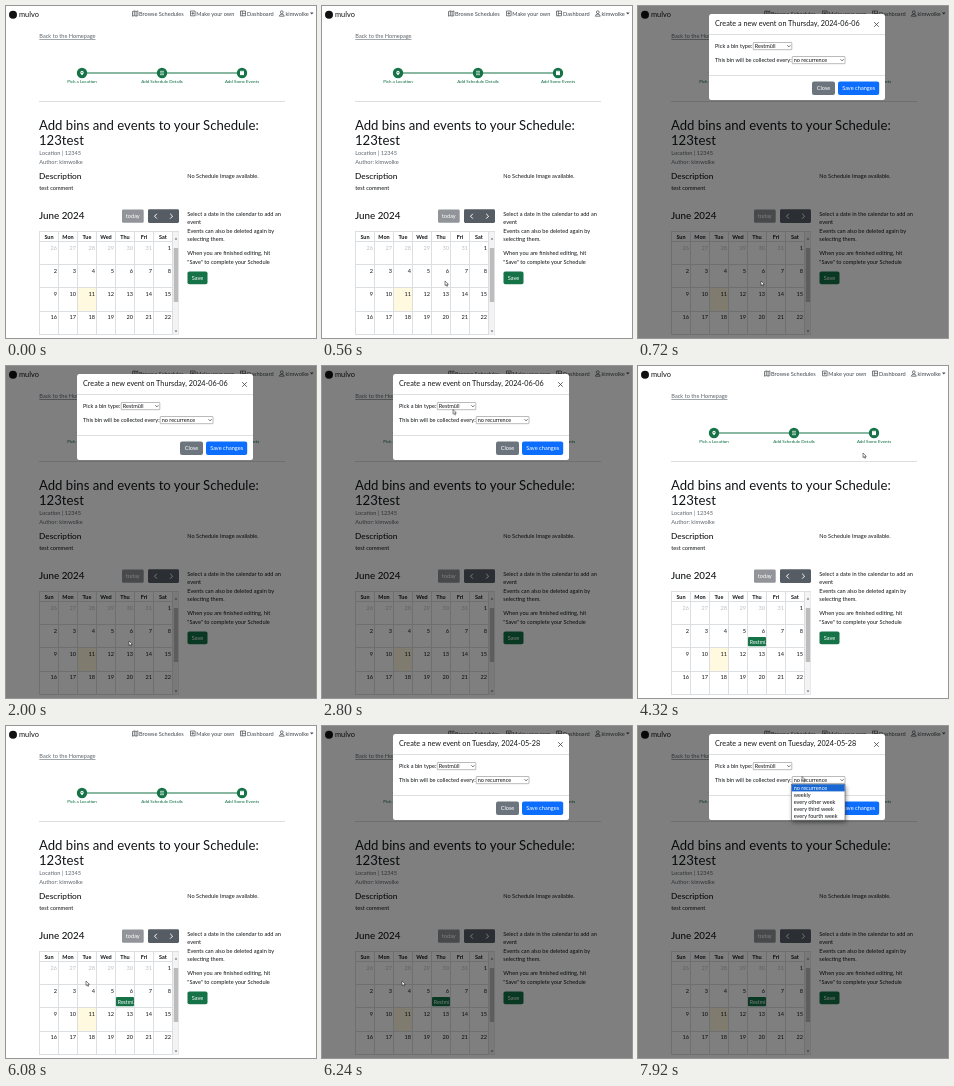
An HTML page that plays this animation: 310x332 px, repeating every 8000 ms.

```html
<!DOCTYPE html>
<html lang="en">
<head>
<meta charset="utf-8">
<title>Schedule editor</title>
<style>
html, body { margin: 0; width: 100%; height: 100%; overflow: hidden; background: #fff; }
svg { display: block; width: 310px; height: 332px; }
text { font: 5.62px Lato, sans-serif; fill: #111417; }
.mid { text-anchor: middle; }
.end { text-anchor: end; }
.muted { fill: #5c646b; }
.nav { fill: #43484d; }
.white { fill: #fff; }
.h1 { font-size: 13.15px; }
.h2 { font-size: 9.8px; font-weight: 500; }
.h3 { font-size: 8.3px; font-weight: 500; }
.title { font-size: 7.25px; }
.step { font-size: 4.45px; fill: #157347; font-weight: 500; text-anchor: middle; }
.day { font-size: 5.5px; font-weight: 700; text-anchor: middle; }
.other { fill: #bcbec0; }
.opt { font-size: 5.5px; }
.line { fill: none; stroke: #dcdfe2; stroke-width: 1; shape-rendering: crispEdges; }
.icon { fill: none; stroke: #43484d; stroke-width: .7; }
.glyph { fill: none; stroke: #fff; stroke-width: .7; }
.green { fill: #157347; }

.anim { animation: 8s infinite step-end; }
#modal { animation-name: modal; }
#thu { animation-name: thursday; }
#tue { animation-name: tuesday; }
#event { animation-name: event; }
#list { animation-name: list; }
#submit { animation-name: hover; }
#cursor { animation: move 8s infinite ease-in-out, show 8s infinite step-end; }
@keyframes modal { 0%, 54% { visibility: hidden } 9%, 78% { visibility: visible } }
@keyframes thursday { 0% { opacity: 1 } 54% { opacity: 0 } }
@keyframes tuesday { 0% { opacity: 0 } 54% { opacity: 1 } }
@keyframes event { 0% { visibility: hidden } 54% { visibility: visible } }
@keyframes list { 0% { visibility: hidden } 99% { visibility: visible } }
@keyframes hover { 0%, 54% { fill: #0d6efd } 47% { fill: #0b5ed7 } }
@keyframes show { 0% { opacity: 0 } 1% { opacity: 1 } }
@keyframes move {
  0%, 1% { transform: translate(150px, 296px) }
  7%, 25% { transform: translate(123px, 275px) }
  35%, 42% { transform: translate(131px, 43.5px) }
  50%, 62% { transform: translate(225px, 87px) }
  72%, 83% { transform: translate(80px, 255px) }
  93%, 94% { transform: translate(166px, 49px) }
  97%, 100% { transform: translate(164px, 50.5px) }
}
</style>
</head>
<body>
<svg viewBox="0 0 310 332">
  <circle cx="7" cy="8.8" r="4" fill="#111"/>
  <text x="13" y="11.2" style="font-size:7.4px">mulvo</text>
  <g class="icon">
    <path d="M126.500 5.500l1.800-.6 1.800 .6 1.800-.6v4.700l-1.800 .6-1.800-.6-1.800 .6zM128.300 5v4.500M130.100 5.500v4.500"/>
    <path d="M184.500 5h4.600v4.800h-4.600zM186.800 6v2.800M185.400 7.400h2.800"/>
    <path d="M234.500 5h5v4.800h-5zM236.300 5v4.800M236.300 7.400h3.200"/>
    <circle cx="275.800" cy="6.200" r="1.400"/>
    <path d="M273.400 10.200q0-2 2.400-2t2.400 2z"/>
  </g>
  <text class="nav" x="133" y="9.700">Browse Schedules</text>
  <text class="nav" x="190.300" y="9.700">Make your own</text>
  <text class="nav" x="241" y="9.700">Dashboard</text>
  <text class="nav" x="279.500" y="9.700">kimwolke</text>
  <path d="M304 6.600h3.600l-1.800 2z" fill="#43484d"/>

  <text class="muted" x="33.300" y="32" text-decoration="underline">Back to the Homepage</text>

  <path d="M76 67H236" stroke="#157347" stroke-width="1.200"/>
  <g class="green">
    <circle cx="76" cy="67" r="5.200"/><circle cx="156" cy="67" r="5.200"/><circle cx="236" cy="67" r="5.200"/>
  </g>
  <path class="white" d="M76 69.300q-2.500-2.600-1.300-3.900a1.800 1.800 0 0 1 2.600 0q1.200 1.300-1.300 3.900z"/>
  <circle class="green" cx="76" cy="66.400" r=".6"/>
  <path class="glyph" d="M154 65.300h4M154 67h4M154 68.700h4"/>
  <path class="white" d="M234 65.200h4v3.900h-4z"/>
  <path class="glyph" d="M235 64.400v1M237 64.400v1"/>
  <text class="step" x="76" y="77">Pick a Location</text>
  <text class="step" x="156" y="77">Add Schedule Details</text>
  <text class="step" x="236" y="77">Add Some Events</text>
  <path class="line" d="M33 95.500H279"/>

  <text class="h1" x="33" y="124">Add bins and events to your Schedule:</text>
  <text class="h1" x="33" y="138.600">123test</text>
  <text class="muted" x="33.300" y="149">Location | 12345</text>
  <text class="muted" x="33.300" y="157.700">Author: kimwolke</text>
  <text class="h3" x="33" y="172.500">Description</text>
  <text x="181.300" y="171.500">No Schedule Image available.</text>
  <text x="33.300" y="184.200">test comment</text>

  <text class="h2" x="33" y="213">June 2024</text>
  <rect x="116" y="203.500" width="21.700" height="13.300" rx="1.400" fill="#919498"/>
  <text class="mid white" x="126.800" y="212.200">today</text>
  <rect x="142" y="203.300" width="31" height="13.700" rx="1.400" fill="#565c64"/>
  <path class="glyph" style="stroke-width:1" d="M150.900 207.800l-2.400 2.400 2.400 2.400M164.200 207.800l2.400 2.400-2.400 2.400"/>

  <rect x="71.500" y="282" width="19" height="23" fill="#fffadf"/>
  <g id="grid"></g>
  <rect x="167" y="226" width="5.500" height="102.500" fill="#f3f3f3"/>
  <rect x="167.800" y="242" width="4.400" height="54" fill="#bcbcbc"/>
  <path d="M168.700 233.500l1.300-1.700 1.300 1.700zM168.700 324.500l1.300 1.700 1.300-1.700z" fill="#666"/>
  <g id="event" class="anim">
    <rect class="green" x="110" y="271" width="18" height="9.300" rx="1"/>
    <svg x="110" y="271" width="17.500" height="9.300" viewBox="0 0 17.500 9.300">
      <text class="white" x="1.800" y="6.700" style="font-size:5.200px">Restmüll</text>
    </svg>
  </g>

  <text x="181.300" y="209.700">Select a date in the calendar to add an</text>
  <text x="181.300" y="218.200">event</text>
  <text x="181.300" y="226.700">Events can also be deleted again by</text>
  <text x="181.300" y="235.200">selecting them.</text>
  <text x="181.300" y="249.200">When you are finished editing, hit</text>
  <text x="181.300" y="257.700">"Save" to complete your Schedule</text>
  <rect class="green" x="181.500" y="265.500" width="20" height="12.800" rx="1.800"/>
  <text class="mid white" x="191.500" y="274">Save</text>

  <g id="modal" class="anim">
    <rect width="310" height="332" opacity=".5"/>
    <rect x="71" y="8" width="176" height="86" rx="2.500" fill="#fff"/>
    <path class="line" d="M71 28.500H247M71 69.500H247"/>
    <text id="thu" class="title anim" x="77" y="20.300">Create a new event on Thursday, 2024-06-06</text>
    <text id="tue" class="title anim" x="77" y="20.300">Create a new event on Tuesday, 2024-05-28</text>
    <path d="M236.200 16.200l4.600 4.600M240.800 16.200l-4.600 4.600" stroke="#444" stroke-width=".8"/>
    <text x="77" y="42">Pick a bin type:</text>
    <text x="77" y="56">This bin will be collected every:</text>
    <g fill="none" stroke="#767676" stroke-width=".5">
      <rect x="115.200" y="36.500" width="38.600" height="7.200" rx=".6"/>
      <rect x="154.200" y="50.500" width="52.800" height="7.200" rx=".6"/>
    </g>
    <text class="opt" x="116.800" y="42">Restmüll</text>
    <text class="opt" x="155.700" y="56">no recurrence</text>
    <path d="M149.400 39.300l1.500 1.500 1.500-1.500M202.600 53.300l1.500 1.500 1.500-1.500" fill="none" stroke="#222" stroke-width=".7"/>
    <rect x="174" y="75.500" width="23" height="13.500" rx="2" fill="#6c757d"/>
    <text class="mid white" x="185.500" y="84.300">Close</text>
    <rect id="submit" class="anim" x="200" y="75.500" width="41.200" height="13.500" rx="2" fill="#0d6efd"/>
    <text class="mid white" x="220.600" y="84.300">Save changes</text>
    <g id="list" class="anim">
      <rect x="153.500" y="58.200" width="53.500" height="36" fill="#fff" stroke="#555" stroke-width=".6" style="filter:drop-shadow(1px 2px 2px #0006)"/>
      <rect x="153.800" y="58.400" width="52.900" height="7" fill="#1967d2"/>
    </g>
  </g>

  <path id="cursor" d="M0 0v4.600l1.100-1 .8 1.800 .8-.4-.8-1.700h1.500z" fill="#fff" stroke="#111" stroke-width=".5"/>
</svg>
<script>
const NS = "http://www.w3.org/2000/svg";
const add = (parent, tag, attrs, content = "") => {
  const el = document.createElementNS(NS, tag);
  for (const key in attrs) el.setAttribute(key, attrs[key]);
  el.textContent = content;
  parent.append(el);
};

const grid = document.getElementById("grid");
const left = 33.5, top0 = 235.5, colW = 19, rowH = 23.2;
let lines = `M${left} 225.500H172.500V328.500H${left}zM${left} ${top0}H167`;
["Sun", "Mon", "Tue", "Wed", "Thu", "Fri", "Sat"].forEach((name, col) => {
  const x = left + col * colW;
  lines += `M${x + colW} 225.500V328.500`;
  add(grid, "text", { class: "day", x: x + colW / 2, y: 232.6 }, name);
  for (let row = 0; row < 4; row++) {
    const date = row * 7 + col - 5;
    const other = date < 1;
    add(grid, "text", {
      class: other ? "end other" : "end",
      x: x + colW - 1.4,
      y: top0 + row * rowH + 8
    }, other ? date + 31 : date);
  }
});
for (let row = 1; row < 4; row++) lines += `M${left} ${top0 + row * rowH}H167`;
add(grid, "path", { class: "line", d: lines });

const list = document.getElementById("list");
["no recurrence", "weekly", "every other week", "every third week", "every fourth week"].forEach((label, i) =>
  add(list, "text", { class: i ? "opt" : "opt white", x: 155.7, y: 63.7 + i * 7.1 }, label));
</script>
</body>
</html>
```
